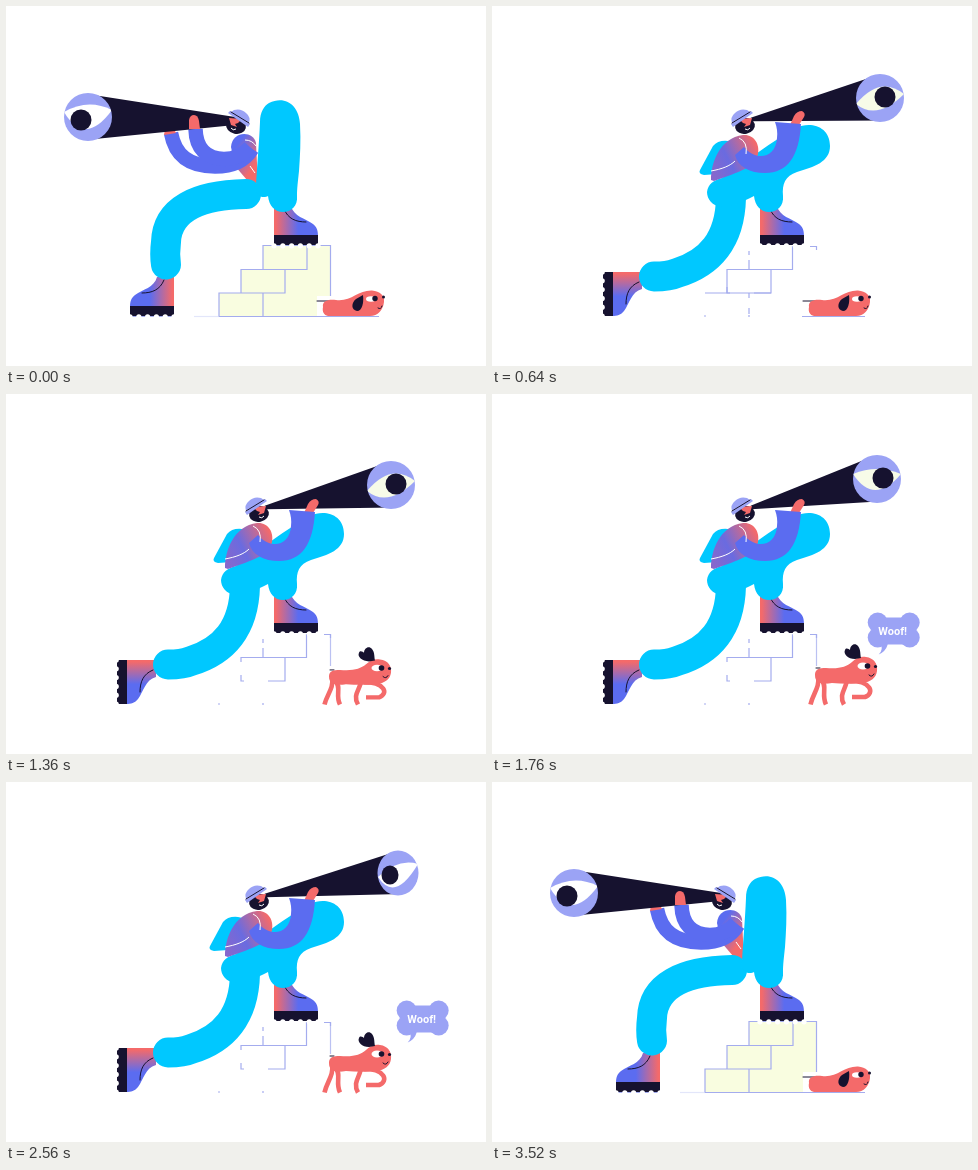
Animation, 480 px wide and 360 px high, one loop 3.6 s. Source, as an HTML page:

```html
<!DOCTYPE html>
<html lang="en">
<head>
<meta charset="utf-8">
<title>Lookout</title>
<style>
html, body { margin: 0; width: 100%; height: 100%; overflow: hidden; background: #fff; }
svg { display: block; width: 100vw; height: 100vh; }
text { font: bold 11px Roboto, sans-serif; fill: #fff; text-anchor: middle; }
.cyan { fill: #00c8ff; }
.dark { fill: #16122f; }
.coral { fill: #f46a6a; }
.peri { fill: #9ba3f5; }
.line { fill: none; stroke: #16122f; stroke-width: 1; stroke-linecap: round; }
.wall { fill: none; stroke: #a4acee; stroke-width: 1.2; }
.arm { fill: none; stroke: #5b6cf0; stroke-width: 14.5; }
.seam { fill: none; stroke: #fff; stroke-width: 1; }
.limb { fill: none; stroke: #f46a6a; stroke-width: 4.6; stroke-linejoin: round; }
</style>
</head>
<body>
<svg viewBox="0 0 480 360">
  <defs>
    <linearGradient id="bootTone"><stop offset=".04" stop-color="#f46a6a"/><stop offset=".55" stop-color="#5b6cf0"/></linearGradient>
    <linearGradient id="coatTone" x1="0" y1=".8" x2="1" y2=".3"><stop offset="0" stop-color="#8768cc"/><stop offset=".4" stop-color="#6a6be0"/><stop offset="1" stop-color="#f46a6a"/></linearGradient>
    <linearGradient id="backTone" x1="0" y1="0" x2=".8" y2="1"><stop offset=".25" stop-color="#5b6cf0"/><stop offset=".8" stop-color="#f46a6a"/></linearGradient>
    <clipPath id="lensClip"><ellipse id="clipShape"/></clipPath>
    <g id="boot">
      <path fill="url(#bootTone)" d="M0 -39H17C20 -28 31 -27 39 -21C43 -18 44 -14 44 -9H0Z"/>
      <path class="line" d="M10 -36C14 -26 22 -23 32 -23"/>
      <path class="dark" d="M0 -10H44V0H0Z"/>
      <g id="tread" fill="#fff"></g>
    </g>
    <g id="head">
      <ellipse class="dark" cx="230" cy="120" rx="10" ry="7.800" transform="rotate(12 230 120)"/>
      <path class="coral" d="M223 112L236 113L232 117L229 118L231 121L225 119Z"/>
      <path class="seam" d="M225 122Q227 125 230 123"/>
      <path class="peri" d="M225 106L228 104Q235 102 240 107Q245 111 243 117Z"/>
      <path class="peri" d="M222 107L224 105L244 118L242 121Z"/>
      <path class="line" d="M225 106L243 117"/>
    </g>
  </defs>

  <g id="wall">
    <path fill="#f9fde0" d="M257 240H324.500V310H213V287H235V263H257Z"/>
    <path id="pale" fill="#fff" d="M213 287H257V310H213Z"/>
    <path class="wall" d="M213 310.500V287H279V263.500M235 287V263.500H301V239.500M257 263V239.500H324.500V310.500H213M257 287V310"/>
  </g>
  <g id="ghost">
    <path class="wall" d="M235 263.500H300.500V240M279 263V287H262M235 263V268M235 281V287H238M257 245V249M257 254V263M318 240.500H324.500V244M212 310H214M257 309V311"/>
    <path id="ghostLow" class="wall" d="M213 287H279M235 268V287M257 287V292M257 302V308"/>
    <path id="ghostSide" class="wall" stroke-opacity=".75" d="M324.500 240V272"/>
  </g>
  <g id="ground">
    <path class="wall" d="M122 310.500H170"/>
    <path class="wall" stroke-opacity=".3" d="M188 310.500H213"/>
  </g>

  <use id="backBoot" href="#boot"/>
  <use href="#boot" transform="translate(268 239)"/>

  <g id="upperL">
    <path fill="url(#backTone)" d="M225 141C226 125 247 124 250 137L252 178L241 174L229 160Z"/>
    <g id="armsL">
      <path class="arm" d="M165 127C169 149 183 160.500 209 160.500C228 160.500 240 153 246 143"/>
      <path class="arm" d="M189.500 123C190 143 201 153 218 153C230 153 238 148 244 141"/>
      <path class="seam" d="M239 134Q246 134 250 140M244 160L249 167"/>
    </g>
  </g>
  <path id="pack" class="cyan" d="M208 164L221 140Q226 134 236 135L250 138L240 167L212 169Q206 168 208 164Z"/>
  <path id="leg" fill="none" stroke="#00c8ff" stroke-width="30" stroke-linecap="round"/>
  <path id="thigh" class="cyan"/>

  <path id="handBack" class="coral" d="M158 128Q158 122 164 122L169 124L170 126Z"/>
  <path id="tube" class="dark"/>
  <ellipse id="lens" class="peri"/>
  <g clip-path="url(#lensClip)">
    <path id="eye"/>
    <ellipse id="pupil" class="dark"/>
  </g>
  <use id="face" href="#head"/>
  <path id="handL" class="coral" d="M183 123V114Q184 109 188 109Q192 109 193 115L194 123Z"/>
  <g id="upperR">
    <path fill="url(#coatTone)" d="M219 174C219 156 228 132 251 129C262 128 268 138 266 148C263 163 240 168 222 175Z"/>
    <path class="coral" d="M298 119L302 110Q305 105 310 105Q314 107 312 111L307 119Z"/>
    <path fill="#5b6cf0" d="M283 116L309 118C307 150 296 167 273 167C258 167 246 161 243 149L252 141C264 156 284 152 285 132Q286 124 283 116Z"/>
    <path class="seam" d="M219 165C230 163 238 160 243 155M247 132Q256 136 254 148"/>
  </g>

  <g id="lying">
    <path fill="#fff" d="M311 290H326V310H311Z"/>
    <path class="wall" d="M310 310.500H373"/>
    <path class="line" d="M311 295H323"/>
    <path class="coral" d="M317 301C316 295 322 293 330 294C345 296 352 284 366 284.500C374 285 379 290 378 296C377 304 372 310 364 310H322C318 309 316 306 317 301Z"/>
    <path class="dark" d="M357 289C358 297 356 305 351 305C345 304 345 297 350 293Z"/>
    <ellipse cx="365" cy="293" rx="5" ry="2.800" fill="#fff"/>
    <circle class="dark" cx="369" cy="292.500" r="2.700"/>
    <circle class="dark" cx="377.500" cy="291" r="1.500"/>
    <path class="line" d="M372 302Q375 304 376 300"/>
  </g>
  <g id="standing">
    <path id="tail" class="line"/>
    <path class="limb" d="M326 282C328 294 321 299 318.500 310.500M329 286C336 291 329 301 334 310.500M355 285C355 294 346 300 352 310.500M358 287C379 287 383 299 373 303H360"/>
    <path class="coral" d="M323 281C323 275 327 274 334 274C348 275 354 273 360 268C364 264 369 262 374 263C382 264 386 270 385 277C384 284 379 288 370 289C361 290 350 290 340 289C330 291 323 289 323 281Z"/>
    <path class="dark" d="M369 264L363 265C356 265 351 260 353 256C354 253 357 255 358 256C358 251 363 248 366 252C369 256 368 260 369 264Z"/>
    <ellipse cx="371" cy="272" rx="5.500" ry="3.500" fill="#fff"/>
    <circle class="dark" cx="375.500" cy="272" r="2.800"/>
    <circle class="dark" cx="383.500" cy="272.500" r="1.600"/>
    <path class="line" d="M377 281Q380 284 382 280"/>
  </g>
  <g id="bubble">
    <path class="peri" d="M-21 -13H21V14H-6Q-8 21 -15 24Q-10 19 -13 13H-21Z"/>
    <g id="knobs" class="peri"></g>
    <text x="-1" y="4">Woof!</text>
  </g>
</svg>
<script>
const LOOP = 3600, STEP = 80;
const el = id => document.getElementById(id);
const set = (id, attrs) => {
  for (const key in attrs) el(id).setAttribute(key, attrs[key]);
};
const show = (id, on) => set(id, { visibility: on ? "visible" : "hidden" });
const lerp = (a, b, k) => a + (b - a) * k;
const ramp = (t, from, to) => {
  const k = Math.min(1, Math.max(0, (t - from) / (to - from)));
  return k * k * (3 - 2 * k);
};
const circles = (id, points, r) => {
  el(id).innerHTML = points.map(([x, y]) => `<circle cx="${x}" cy="${y}" r="${r}"/>`).join("");
};
circles("tread", [0, 1, 2, 3, 4, 5].map(i => [i * 8.8, 0.8]), 2.6);
circles("knobs", [[-16, -8], [16, -8], [-16, 7], [16, 7]], 10);

// Two outlines with the same commands blend number by number.
const blend = (a, b, k) => {
  const ends = b.match(/-?[\d.]+/g);
  let i = 0;
  return a.replace(/-?[\d.]+/g, n => lerp(+n, +ends[i++], k).toFixed(2));
};
const LEG = [
  "M160 258.5C159 252 159 244 160 236C161 204 190 189 240 188",
  "M162 270.5C170 270.5 178 270 185 267C218 257 238 234 239 192"
];
const THIGH = [
  "M263 97C280 89 293 100 294 118C295 135 294 150 293 165C292 175 291 182 291 190C292 200 285 206 277 206C269 206 263 200 262 190C259 192 254 191 252 189C250 187 249 184 250 180C251 160 253 140 254 116C254 106 258 100 263 97Z",
  "M304 122C318 115 338 120 338 140C338 156 322 161 305 166C293 170 290 178 291 190C292 200 285 206 277 206C269 206 263 200 262 190C250 196 240 201 230 201C220 200 215 193 215 186C216 178 222 174 230 172C255 155 280 135 304 122Z"
];

// Lens x, y, rx, ry; pupil dx, dy, rx; eye corners; upper and lower lid pull.
const LOOK = {
  left: [82, 111, 24, 24, -7, 3, 10.5, -24, -5, 24, -7, -19, 30],
  leftTurn: [87, 112, 18.5, 22, 6, -2, 8, -19, 6, 17, -11, -18, 27],
  over: [205, 72, 20, 24, 0, 0, 9, -20, 0, 20, 0, -22, 22],
  rightFar: [388, 92, 24, 24, 5, -1, 10.5, -24, 6, 24, -4, -23, 23],
  right: [385, 91, 24, 24, 5, -1, 10.5, -24, 6, 24, -4, -23, 23],
  rightUp: [385, 85, 24, 24, 6, -1, 10.5, -24, -5, 24, -5, -15, 27],
  rightTurn: [392, 91, 20.5, 22.5, -8, 2, 8.5, -20, 4, 20, -9, -15, 30]
};
const LOOKS = [
  [0, "left"], [320, "left"], [480, "leftTurn"], [560, "over"], [640, "rightFar"],
  [800, "right"], [1680, "right"], [1760, "rightUp"], [2400, "rightUp"],
  [2560, "rightTurn"], [2640, "rightFar"], [2720, "over"], [2800, "left"], [LOOP, "left"]
];
function lookAt(t) {
  const i = LOOKS.findIndex((key, n) => n && t <= key[0]);
  const [t0, a] = LOOKS[i - 1], [t1, b] = LOOKS[i];
  const k = ramp(t, t0, t1);
  return LOOK[a].map((v, n) => lerp(v, LOOK[b][n], k));
}

function drawScope(t, turn) {
  const [x, y, rx, ry, px, py, pr, ax, ay, bx, by, up, low] = lookAt(t);
  const tipX = lerp(229, 259, turn), tipY = lerp(115, 113.5, turn), tip = lerp(4, 1.8, turn);
  const len = Math.hypot(tipX - x, tipY - y);
  const nx = (y - tipY) / len, ny = (tipX - x) / len;
  const rim = ry * 0.95;
  const at = (cx, cy, r) => `${cx + nx * r} ${cy + ny * r}`;
  set("tube", { d: `M${at(x, y, rim)}L${at(tipX, tipY, tip)}L${at(tipX, tipY, -tip)}L${at(x, y, -rim)}Z` });
  const oval = { cx: x, cy: y, rx, ry };
  set("lens", oval);
  set("clipShape", oval);
  set("eye", {
    d: `M${x + ax} ${y + ay}Q${x} ${y + up} ${x + bx} ${y + by}Q${x - 3} ${y + low} ${x + ax} ${y + ay}Z`,
    fill: turn > 0.5 && t < 2400 ? "#f7fbe8" : "#fff"
  });
  set("pupil", { cx: x + px, cy: y + py, rx: pr, ry: Math.max(pr, 9.5) });
}

function drawMan(t) {
  const turn = ramp(t, 500, 640) - ramp(t, 2600, 2800);
  const right = turn >= 0.5;
  const shift = t < 1000 ? ramp(t, 320, 480) : 0;
  set("leg", { d: blend(...LEG, turn) });
  set("thigh", { d: blend(...THIGH, turn) });
  set("backBoot", { transform: right ? "translate(111 266) rotate(90)" : "translate(168 310) scale(-1 1)" });
  set("face", { transform: right ? "translate(483 0) scale(-1 1)" : "" });
  set("armsL", { transform: `translate(${-3 * shift} 0)` });
  set("handBack", { transform: `translate(${-3 * shift} 1)` });
  set("handL", { transform: `translate(${-2 * shift} ${3 * shift})` });
  set("pack", { transform: `translate(${-4 * ramp(t, 2400, 2560)} 0)` });
  for (const id of ["upperL", "handL", "handBack", "wall", "ground"]) show(id, !right);
  for (const id of ["upperR", "pack", "ghost"]) show(id, right);
  show("pale", !right && t > 2700 && t < 2960);
  show("ghostLow", right && t < 1200);
  show("ghostSide", right && t >= 1200);
  drawScope(t, turn);
}

function drawDog(t) {
  const rise = ramp(t, 1200, 1400) - ramp(t, 3060, 3240);
  const up = rise > 0.15;
  show("standing", up);
  show("lying", !up);
  set("standing", { transform: `translate(0 311) scale(1 ${lerp(0.5, 1, rise)}) translate(0 -311)` });
  set("tail", { d: t > 2600 ? "M317 274.500H328" : "M324 274H328" });
  const pop = ramp(t, 1400, 1560) - ramp(t, 3040, 3120);
  const x = 401.7 + (t - 1760) * 0.0187;
  show("bubble", pop > 0.01);
  set("bubble", { transform: `translate(${x - 15 * (1 - pop)} ${236.5 + 22 * (1 - pop)}) scale(${pop})` });
}

function frame(now) {
  const t = Math.floor((now % LOOP) / STEP) * STEP;
  drawMan(t);
  drawDog(t);
  requestAnimationFrame(frame);
}
frame(performance.now());
</script>
</body>
</html>
```
